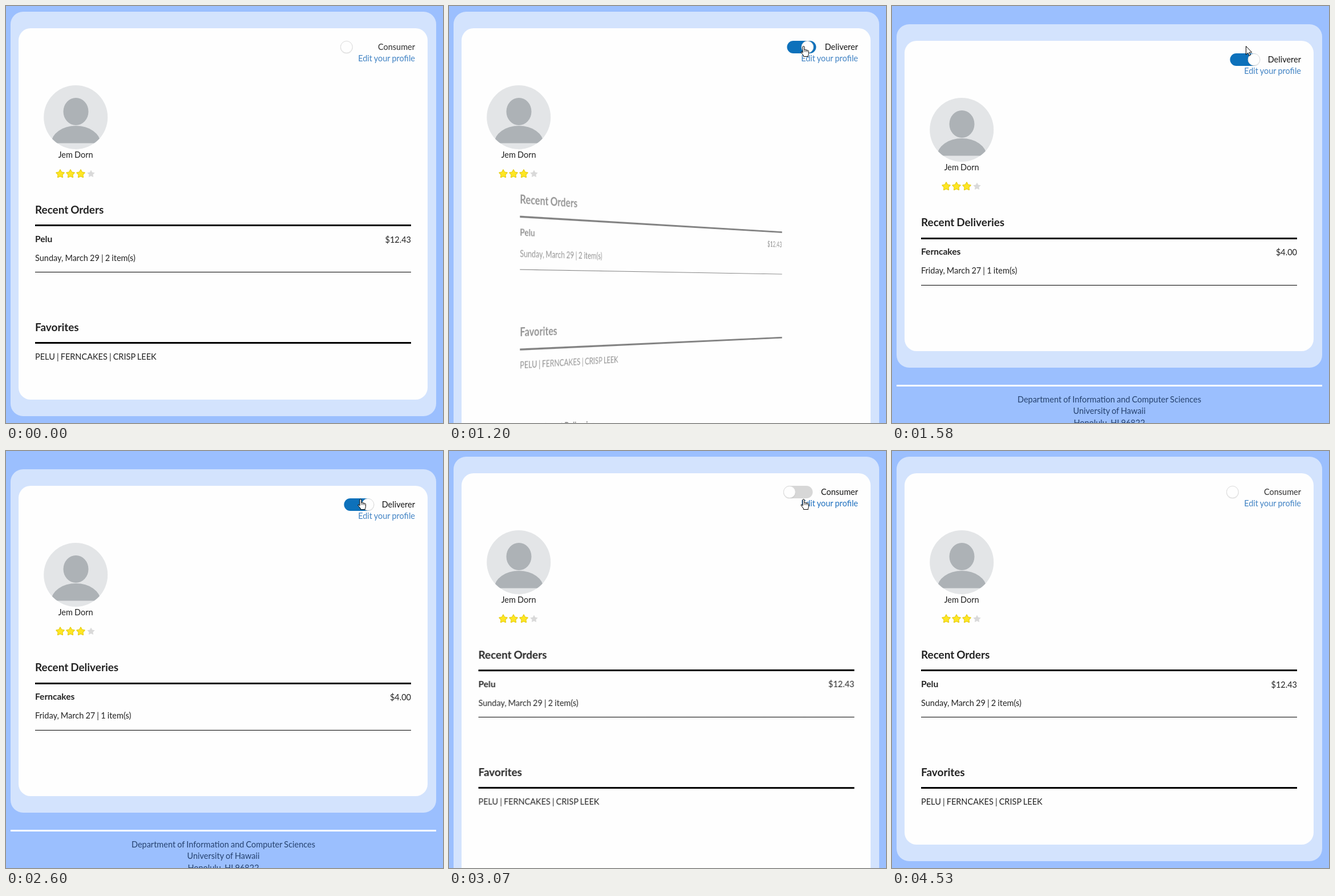
Animation, 766 px wide and 731 px high, one loop 4610 ms. Source, as an HTML page:

```html
<!DOCTYPE html>
<html lang="en">
<head>
<meta charset="utf-8">
<title>Profile</title>
<style>
  html, body { margin: 0; width: 100%; height: 100%; overflow: hidden; background: #9bbffe; }
  #stage { position: absolute; inset: 0; overflow: hidden; contain: strict; }
  #page, svg { position: absolute; left: 0; top: 0; width: 766px; height: 731px; }
  svg { overflow: visible; }
  text { font: 14.5px Lato, sans-serif; fill: #222; word-spacing: -.04em; }
  .h3 { font-size: 18.95px; font-weight: 700; }
  .h4 { font-size: 15.55px; font-weight: 700; }
  .end { text-anchor: end; }
  .mid { text-anchor: middle; }
  .foot { fill: #26426f; }
  .star { fill: #ffe623; stroke: #e3cb12; stroke-width: 2; paint-order: stroke; }
  .star.off { fill: #d9d9d9; stroke: none; }
  #orders { transform-origin: 380.5px 501px; }
  #deliveries { transform-origin: 380.5px 447.25px; }
</style>
</head>
<body>
<div id="stage">
<div id="page">
  <svg>
    <defs>
      <clipPath id="round"><circle cx="122.2" cy="195" r="56"/></clipPath>
    </defs>
    <rect id="outer" x="8" y="10" width="746" rx="22" fill="#d3e3fd"/>
    <rect id="inner" x="22" y="39" width="717" rx="21" fill="#fefefe"/>

    <g id="footer">
      <rect x="8" y="642" width="746" height="3" fill="#fff"/>
      <text class="mid foot" x="381" y="673.3">Department of Information and Computer Sciences</text>
      <text class="mid foot" x="381" y="693.4">University of Hawaii</text>
      <text class="mid foot" x="381" y="713.6">Honolulu, HI 96822</text>
    </g>

    <g clip-path="url(#round)">
      <rect x="66" y="139" width="113" height="113" fill="#e3e5e7"/>
      <ellipse cx="122.5" cy="185" rx="22" ry="24" fill="#adb2b6"/>
      <path d="M79.500 240.500A43 30.500 0 0 1 165.500 240.500z" fill="#adb2b6"/>
    </g>
    <text class="mid" x="122" y="266">Jem Dorn</text>
    <g id="stars" stroke-linejoin="round"></g>

    <g id="toggle">
      <rect id="track" x="586.5" y="61" width="51" height="22" rx="11"/>
      <g id="knob">
        <circle cx="596.9" cy="72.6" r="11" opacity=".08"/>
        <circle cx="596.9" cy="71.9" r="10.4" fill="#fefefe" stroke="#dcdcdc"/>
      </g>
    </g>
    <text id="role" class="end" x="717" y="76.8"></text>
    <text id="edit" class="end" x="717" y="97.4">Edit your profile</text>
  </svg>

  <svg id="orders">
    <text class="h3" x="51" y="364">Recent Orders</text>
    <rect x="51" y="383" width="659" height="3"/>
    <text class="h4" x="51" y="413.8">Pelu</text>
    <text class="end" x="710" y="414.5">$12.43</text>
    <text x="51" y="447">Sunday, March 29 | 2 item(s)</text>
    <rect x="51" y="466" width="659" height="1"/>
    <text class="h3" x="51" y="569.8">Favorites</text>
    <rect x="51" y="589" width="659" height="3"/>
    <text x="51" y="620.3">PELU | FERNCAKES | CRISP LEEK</text>
  </svg>

  <svg id="deliveries">
    <text class="h3" x="51" y="364">Recent Deliveries</text>
    <rect x="51" y="384" width="659" height="3"/>
    <text class="h4" x="51" y="413.8">Ferncakes</text>
    <text class="end" x="710" y="414.5">$4.00</text>
    <text x="51" y="447">Friday, March 27 | 1 item(s)</text>
    <rect x="51" y="467" width="659" height="1"/>
  </svg>
</div>

<svg>
  <g id="cursor" fill="#fff" stroke="#000" stroke-linejoin="round">
    <path id="arrow" d="M.5.5V15.3l3.4-3.3 2.2 5.2 2.2-1-2.2-5h4.6z"/>
    <g id="hand" transform="translate(-5 0)">
      <path d="M4 12V2q0-1.5 1.5-1.5T7 2v5q.2-1 1.4-.8T9.700 7.600q.2-.9 1.3-.6t1.2 1.3q.3-.7 1.2-.4t1.1 1.4V13.500q0 1.5-1 3V18.500H5.500V17L2 12.500q-1.6-1.8-.6-2.5t2.6 2z"/>
      <path d="M7 7v3.5M9.700 7.600v3M12.200 8.300v2.5" fill="none" stroke-width=".8"/>
    </g>
  </g>
</svg>
</div>

<script>
const LOOP = 4610;
const ON = 1049, OFF = 2623;       // switch flips
const FLIP = 500, SLIDE = 300;     // durations
const HOVER = 805, BLUR = 4530;
const ORDERS_H = 371.5, DELIVERIES_H = 264.5;

// The screen refreshes only at these moments.
const TICKS = [0, 430, 510, 580, 650, 730, 805, 880, 970, 1050, 1120, 1200, 1280, 1350, 1430,
  1510, 1580, 2140, 2220, 2520, 2600, 2690, 2760, 2840, 2920, 3000, 3070, 3150,
  3470, 3550, 3950, 4010, 4530];

// Pointer: time, x, y, shape
const POINTER = [
  [0], [430, 165, 345, "arrow"], [510, 350, 215, "arrow"], [580, 560, 100, "arrow"],
  [650, 720, 48, "arrow"], [730, 685, 56, "arrow"], [805, 636, 68, "hand"],
  [880, 623, 70, "hand"], [970, 621, 70, "hand"], [1580, 620, 70, "arrow"],
  [2140, 52, 414, "arrow"], [2220], [2520, 570, 125, "arrow"], [2600, 621, 84, "hand"],
  [3470, 66, 551, "arrow"], [3550], [3950, 716, 719, "arrow"], [4010]
];

const $ = id => document.getElementById(id);
const set = (id, name, value) => $(id).setAttribute(name, value);
const show = (id, on) => { $(id).style.display = on ? "" : "none"; };
const lastBefore = (list, t, key) => list.filter(v => key(v) <= t).pop();

// cubic-bezier(.25, .1, .25, 1)
function ease(x) {
  if (x <= 0) return 0;
  if (x >= 1) return 1;
  let lo = 0, hi = 1, s;
  for (let i = 0; i < 24; i++) {
    s = (lo + hi) / 2;
    if (.75 * s * (1 - s) + s ** 3 < x) lo = s; else hi = s;
  }
  return .3 * s * (1 - s) ** 2 + 3 * s * s * (1 - s) + s ** 3;
}

function star(cx, cy, r) {
  const pts = [];
  for (let i = 0; i < 10; i++) {
    const a = Math.PI * (i / 5 - .5), d = i % 2 ? r * .52 : r;
    pts.push((cx + d * Math.cos(a)).toFixed(2) + "," + (cy + d * Math.sin(a)).toFixed(2));
  }
  return pts.join(" ");
}

$("stars").innerHTML = [95, 113, 131, 149].map((x, i) =>
  `<polygon class="star ${i < 3 ? "" : "off"}" points="${star(x, 294.4, 7)}"/>`).join("");

// p: 0 = hidden, 1 = flat; side: which way it turns while partly hidden
function flip(id, p, side, dy) {
  const s = $(id).style;
  show(id, p > 0);
  s.opacity = p;
  s.transform = `translateY(${dy}px)` +
    (p < 1 ? ` perspective(2072px) rotateY(${side * 90 * (1 - p)}deg)` : "");
}

function draw(t) {
  const on = t >= ON && t < OFF;
  const since = t - (t >= OFF ? OFF : ON);
  const moving = since >= 0 && since < FLIP;
  const settled = on && !moving;
  const p = t < ON ? 1 : ease(since / FLIP);

  $("page").style.transform = `translateY(${settled ? 22 : 0}px)`;
  const grow = moving ? DELIVERIES_H : settled ? DELIVERIES_H - ORDERS_H : 0;
  set("outer", "height", 709 + grow);
  set("inner", "height", 651 + grow);
  show("footer", settled);

  flip("orders", on ? 1 - p : p, on ? 1 : -1, 0);
  flip("deliveries", on ? p : t < ON ? 0 : 1 - p, on ? -1 : 1, moving ? ORDERS_H : 0);

  const slide = t < ON ? 0 : ease(since / SLIDE);
  set("toggle", "transform", `translate(${on ? 6 : 0} 0)`);
  set("knob", "transform", `translate(${31.6 * (on ? slide : t < ON ? 0 : 1 - slide)} 0)`);
  set("track", "fill", on ? "#0d71bb" : t >= HOVER && t < BLUR ? "#d7d7d7" : "none");
  $("role").textContent = on ? "Deliverer" : "Consumer";
  $("role").style.fill = t >= ON && t < BLUR ? "#151515" : "#303030";
  $("edit").style.fill = t >= OFF && t < 3470 ? "#1e70bf" : "#4183c4";

  const [, x, y, shape] = lastBefore(POINTER, t, v => v[0]);
  show("cursor", shape);
  show("arrow", shape === "arrow");
  show("hand", shape === "hand");
  if (shape) set("cursor", "transform", `translate(${x} ${y})`);
}

const start = performance.now();
function frame() {
  const t = (performance.now() - start) % LOOP;
  draw(lastBefore(TICKS, t, v => v));
  requestAnimationFrame(frame);
}
frame();
</script>
</body>
</html>
```
